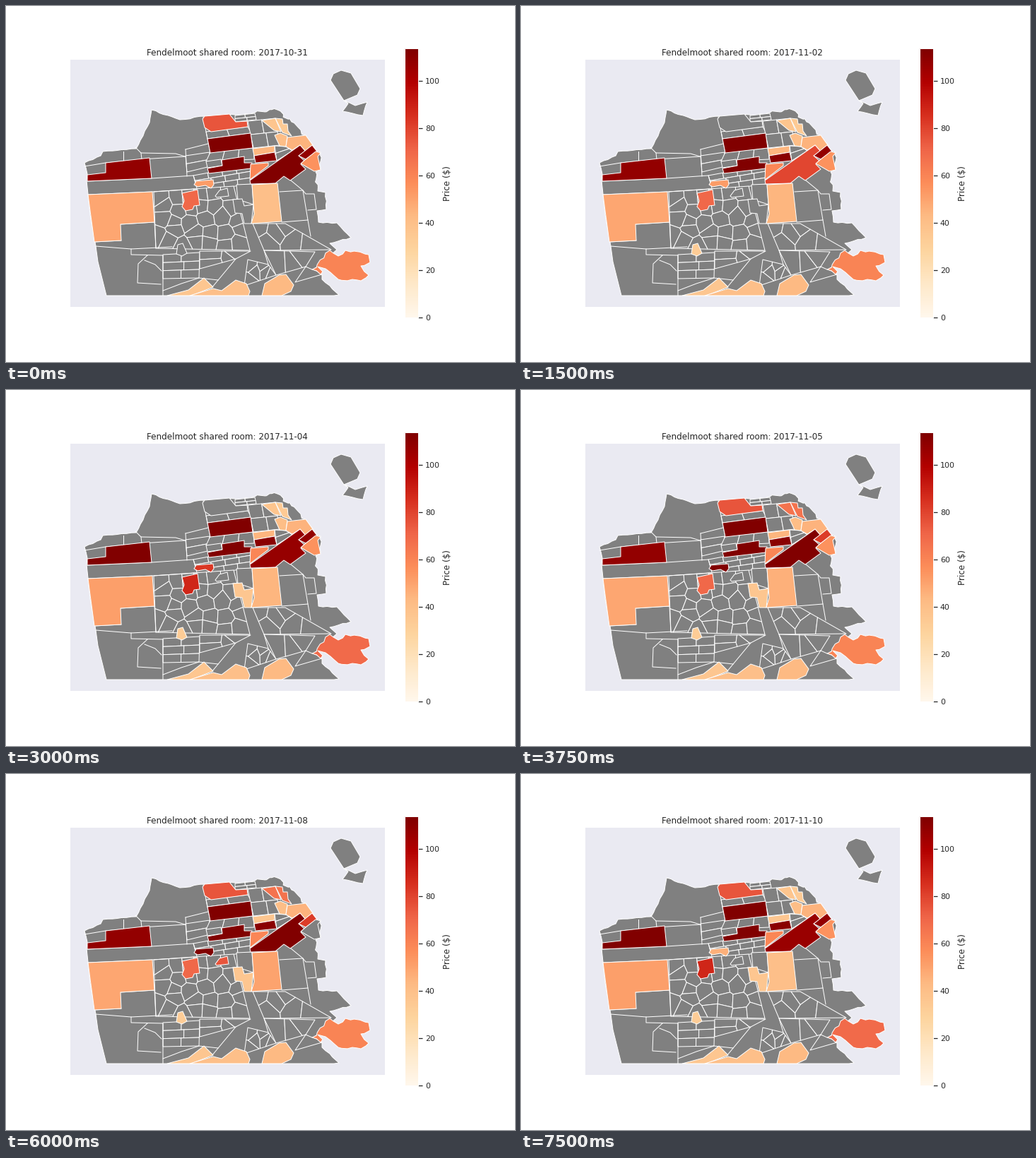
Write a matplotlib script that moves like this. It is 720 px wide and 504 px high and loops after 8000 ms.

```python
import numpy as np
import matplotlib.pyplot as plt
from matplotlib.animation import FuncAnimation
from matplotlib.cm import ScalarMappable
from matplotlib.colors import Normalize
from matplotlib.patches import Polygon, Rectangle

W, H, DPI = 720, 504, 72
INK, GREY, SEA = "#262626", "#808080", "#eaeaf2"
plt.rcParams["font.family"] = "DejaVu Sans"

rng = np.random.default_rng(7)
scale = ScalarMappable(Normalize(0, 113.5), "OrRd")
fig = plt.figure(figsize=(W / DPI, H / DPI), dpi=DPI, facecolor="white")
ax = fig.add_axes([0, 0, 1, 1])
ax.set(xlim=(0, W), ylim=(H, 0))
ax.axis("off")
ax.add_patch(Rectangle((90.5, 76), 445.7, 350, fc=SEA, lw=0))
title = ax.text(313.2, 69.7, "", size=12, color=INK, ha="center", va="baseline")
priced = []


def points(xy):
    return np.reshape(xy, (-1, 2)).astype(float)


def rough(amp, *xy, step=6):
    """Path through key points, with a ragged edge between them."""
    path = points(xy)
    out = []
    for a, b in zip(path, path[1:]):
        n = max(1, int(np.hypot(*(b - a)) / step))
        t = np.arange(n)[:, None] / n
        out.append(a + t * (b - a) + rng.uniform(-amp, amp, (n, 2)) * (t > 0))
    return np.vstack(out + [path[-1:]])


def land(path, zorder=1):
    shape = Polygon(path, fc=GREY, ec="white", lw=1, joinstyle="round", zorder=zorder)
    ax.add_patch(shape)
    return shape


def line(*xy):
    x, y = points(xy).T
    ax.plot(x, y, color="white", lw=1, solid_joinstyle="round", zorder=2)


def spread(quad, u, v):
    """Map unit coordinates into a quad given clockwise from its top left."""
    a, b, c, d = quad
    u, v = np.ravel(u)[:, None], np.ravel(v)[:, None]
    return (a * (1 - u) + b * u) * (1 - v) + (d * (1 - u) + c * u) * v


def blocks(cols, rows, *xy):
    """Street blocks: even rows, each with its own cross streets."""
    quad = points(xy)
    for r in range(rows):
        top, bottom = r / rows, (r + 1) / rows
        cuts = (np.arange(cols + 1) + 0.15 * (r % 2) * (np.arange(cols + 1) % cols > 0)) / cols
        for left, right in zip(cuts, cuts[1:]):
            land(spread(quad, [left, right, right, left], [top, top, bottom, bottom]))


def clip(path, mid, normal):
    side = (path - mid) @ normal
    out = []
    for i in range(len(path)):
        if side[i - 1] * side[i] < 0:
            t = side[i - 1] / (side[i - 1] - side[i])
            out.append(path[i - 1] + t * (path[i] - path[i - 1]))
        if side[i] <= 0:
            out.append(path[i])
    return np.array(out)


def cells(cols, rows, *xy):
    """Irregular districts: Voronoi cells of a jittered grid."""
    quad = points(xy)
    u, v = np.meshgrid(np.arange(cols) + 0.5, np.arange(rows) + 0.5)
    u = (u + rng.uniform(-0.35, 0.35, u.shape)) / cols
    v = (v + rng.uniform(-0.35, 0.35, v.shape)) / rows
    seeds = spread(quad, u, v)
    for i, p in enumerate(seeds):
        cell = quad
        for q in np.delete(seeds, i, 0):
            cell = clip(cell, (p + q) / 2, q - p)
        land(cell)


def area(price, *xy, peak=None, amp=0):
    """A priced district; a dict gives the first day of each new price."""
    steps = price if isinstance(price, dict) else {0: price}
    path = rough(amp, *xy, *xy[:2]) if amp else points(xy)
    priced.append((land(path, zorder=3), steps, peak))


# Coast, clockwise from the north-western cape, then the islands
coast = [
    rough(0.8, 206, 147, 246, 161, 281, 156, 324, 154),
    rough(2.5, 324, 154, 352, 151, 384, 147, 404, 164, 424, 183, 433, 195, step=4),
    rough(2, 439, 205, 445, 207, 444, 232, 438, 235, 441, 262, step=4),
    rough(1, 452, 264, 453, 288, 440, 290, 442, 306, 468, 307, 488, 328, 458, 336),
    rough(1, 468, 345, 434, 373, 447, 381, 447, 387, 458, 396, 471, 409),
    points([464, 410, 142, 410, 130, 362, 127, 340, 119, 295, 114, 247]),
    rough(0.5, 115, 238, 111, 222, 134, 212, 137, 206, 184, 202, 203, 165, 206, 147),
]
land(np.vstack(coast))
land(points([459, 105, 463, 96, 474, 91, 488, 95, 501, 117, 497, 126, 478, 134]))
land(rough(0.6, 478, 134, 484, 138, 476, 149, 505, 155, 511, 136, 494, 141, 478, 134))

# Western avenues and the park
line(111, 227, 141, 222, 192, 217, 254, 213)
line(166, 221, 166, 206)
line(183, 200, 191, 208, 240, 209, 253, 213)
line(192, 217, 191, 208)
line(254, 203, 286, 195)
line(279, 157, 283, 178, 289, 208)
line(254, 203, 256, 241)
line(115, 248, 206, 244, 265, 240, 268, 249)
line(116, 267, 207, 263, 270, 259)
line(125, 334, 163, 332)
line(127, 340, 177, 344, 235, 341)
line(177, 344, 177, 352, 222, 353, 222, 410)
line(200, 353, 187, 365, 186, 392, 219, 394)
line(196, 360, 211, 366, 220, 375)
line(162, 309, 210, 306, 212, 343)

# Northern and central blocks
blocks(2, 1, 283, 178, 342, 171, 347, 180, 285, 188)
blocks(1, 2, 254, 212, 288, 207, 285, 228, 256, 235)
blocks(3, 1, 289, 207, 350, 201, 351, 217, 283, 220)
blocks(4, 3, 265, 240, 346, 225, 347, 252, 271, 262)
blocks(2, 2, 342, 163, 381, 159, 387, 197, 350, 201)
blocks(2, 2, 324, 155, 352, 152, 354, 161, 324, 164)
blocks(1, 2, 380, 198, 396, 199, 405, 205, 383, 219)

# Hills and southern districts
cells(6, 5, 209, 263, 322, 255, 345, 346, 212, 343)
blocks(1, 1, 326, 253, 348, 252, 350, 281, 328, 274)
blocks(2, 3, 222, 352, 274, 349, 273, 385, 222, 386)
line(222, 403, 248, 393, 273, 385, 300, 388)
cells(2, 2, 274, 347, 346, 347, 325, 358, 274, 372)
line(325, 358, 291, 399)
cells(2, 3, 342, 359, 371, 366, 382, 381, 337, 396)
line(365, 346, 371, 366)
cells(3, 2, 349, 308, 395, 308, 460, 345, 365, 346)
cells(3, 1, 365, 346, 437, 348, 424, 369, 382, 381)
line(424, 369, 409, 391, 447, 380)
line(433, 373, 424, 369)
line(403, 247, 420, 261, 427, 303, 390, 306)
line(387, 263, 420, 261, 424, 266, 436, 266, 439, 288, 427, 289)
line(427, 303, 431, 326)

# Priced districts, north to south
area(108, 115, 239, 141, 236, 141, 222, 203, 215, 206, 244, 115, 248, peak=113)
area(49, 116, 267, 207, 263, 210, 306, 162, 309, 163, 332, 125, 334, 119, 290, peak=51)
area({0: 75, 2: None, 5: 75}, 278, 160, 281, 156, 316, 153, 325, 164, 341, 163,
     342, 171, 290, 178, 281, 172)
area(113, 285, 188, 346, 180, 349, 201, 289, 208)
area({0: None, 6: 85, 7: None}, 283, 220, 304, 217, 306, 226, 285, 229)
area(113, 285, 230, 306, 226, 305, 218, 337, 213, 337, 222, 348, 222, 346, 230,
     287, 237)
area({0: 44, 6: 36}, 349, 202, 380, 198, 380, 207, 351, 212)
area(110, 351, 212, 380, 207, 383, 219, 353, 222)
area(59, 346, 224, 371, 222, 371, 226, 345, 246)
area({0: 37, 5: 66, 10: 37}, 362, 162, 381, 159, 389, 178, 379, 176)
area({0: 34, 5: 66, 10: 34}, 381, 159, 391, 160, 392, 167, 398, 167, 399, 177,
     404, 184, 391, 179)
area(41, 380, 183, 388, 180, 398, 184, 396, 199, 387, 198)
area(45, 398, 186, 424, 183, 434, 197, 424, 206, 416, 197, 405, 204, 396, 199)
area({0: 113, 1: 95, 2: 79, 3: 95, 4: 107, 5: 113, 9: 106},
     345, 247, 416, 197, 424, 206, 414, 212, 422, 219, 417, 224, 424, 231,
     402, 247, 393, 241, 381, 251, 346, 252)
area({0: 108, 5: 82, 10: 108}, 414, 212, 433, 197, 440, 206, 424, 217)
area({0: 55, 7: None, 10: 55}, 424, 217, 438, 206, 445, 208, 441, 213, 445, 232,
     436, 234, 417, 223)
area({0: 52, 3: 70, 4: 83, 5: 113, 9: 84, 10: 46},
     266, 253, 269, 248, 293, 246, 294, 253, 290, 258, 282, 254, 271, 256)
area(70, 249, 265, 271, 260, 274, 282, 266, 283, 264, 288, 254, 290, 249, 284,
     252, 276, peak=88)
area({0: None, 6: 105, 7: 90, 8: 75, 9: None}, 296, 269, 302, 261, 313, 258,
     315, 269, 298, 271)
area({0: None, 3: 36}, 321, 274, 334, 273, 337, 283, 350, 281, 347, 308,
     337, 308, 334, 294, 324, 293)
area({0: 40, 2: 44, 5: 46, 8: 50, 9: 40}, 348, 253, 384, 251, 390, 305, 347, 308,
     351, 294)
area({0: None, 1: 33}, 243, 338, 250, 336, 256, 350, 249, 354, 241, 351)
area(60, 433, 373, 458, 346, 470, 354, 480, 346, 513, 352, 515, 363, 502, 368,
     513, 381, 502, 389, 470, 387, 452, 372, 441, 369, 448, 376, 445, 380,
     peak=69, amp=2)
area(36, 228, 410, 258, 402, 280, 385, 293, 398, 262, 410)
area(40, 260, 410, 293, 400, 305, 403, 325, 388, 340, 393, 345, 404, 343, 410)
area(43, 362, 410, 366, 393, 386, 381, 396, 380, 407, 395, 403, 404, 390, 410)

# Colour bar
cax = fig.add_axes([0.78375, 0.125, 0.0264, 0.755])
bar = fig.colorbar(scale, cax=cax, ticks=range(0, 101, 20))
bar.outline.set(edgecolor="white", linewidth=1)
cax.tick_params(length=6, width=1.25, pad=3.5, labelsize=11, color=INK, labelcolor=INK)
bar.set_label("Price ($)", size=12, color=INK)


def draw(i):
    day = i // 3
    date = f"2017-11-{day:02d}" if day else "2017-10-31"
    title.set_text(f"Fendelmoot shared room: {date}")
    for shape, steps, peak in priced:
        price = steps[max(d for d in steps if d <= day)]
        if peak and day % 3 == 1:
            price = peak
        shape.set_facecolor(GREY if price is None else scale.to_rgba(price))
    return [title]


anim = FuncAnimation(fig, draw, frames=32, interval=250, repeat=True,
                     repeat_delay=0, blit=False)
plt.show()
```
